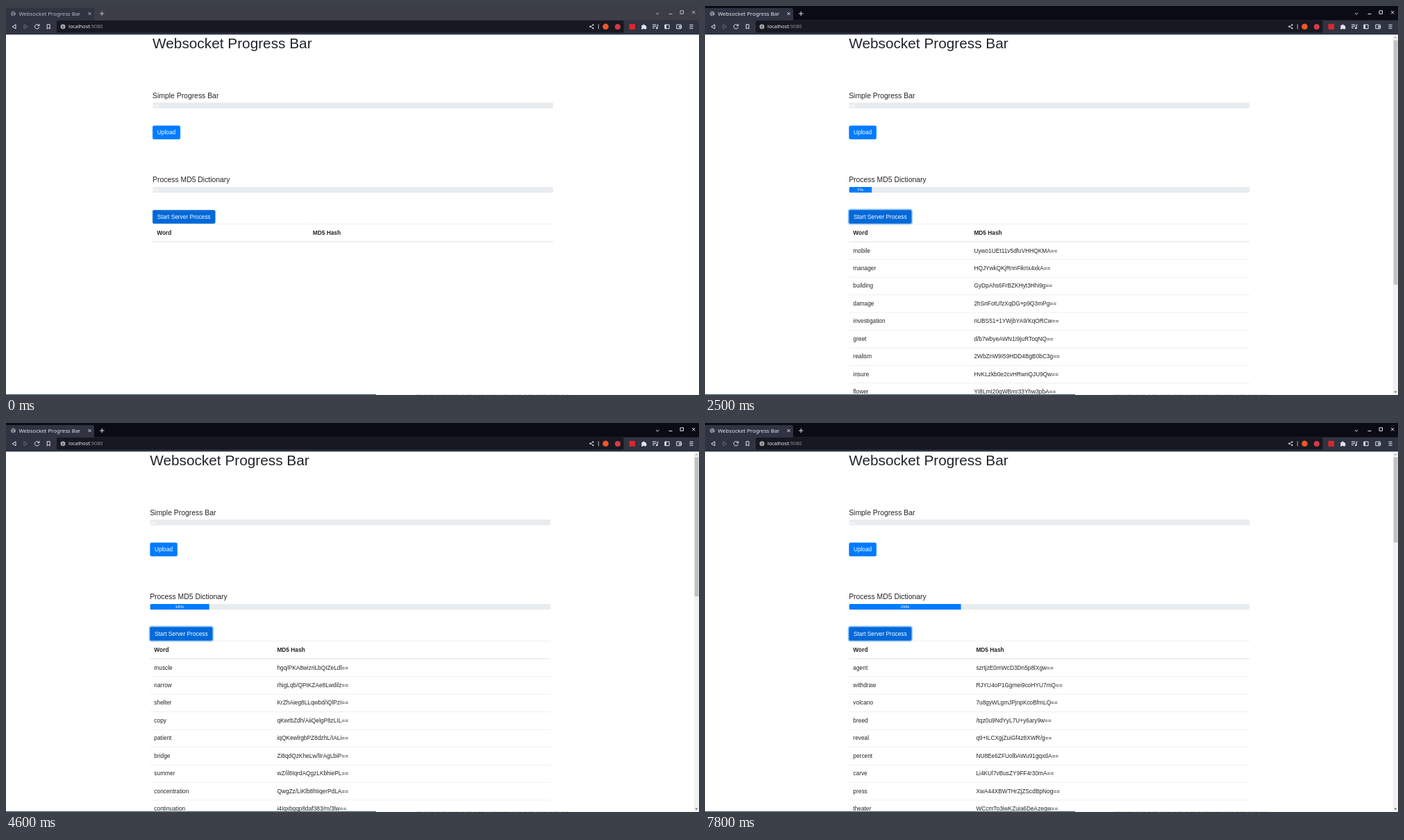
These frames come from a looping animation (998x561 px, 8 s). An HTML page:

```html
<!DOCTYPE html>
<html lang="en">
<head>
<meta charset="utf-8">
<title>Progress</title>
<style>
* { box-sizing: border-box; }
html, body { margin: 0; width: 100%; height: 100%; overflow: hidden; background: #fff; }
#stage { position: absolute; left: 0; top: 0; width: 998px; height: 561px; overflow: hidden; }
#screen { position: absolute; width: 1921px; height: 1080px; transform: scale(.51979); transform-origin: 0 0;
  font: 16px/1.5 "Liberation Sans", Arial, sans-serif; color: #212529; }
#view { position: absolute; left: 1px; top: 80px; width: 1920px; height: 998px; overflow: hidden; }
#page { position: absolute; left: 405px; width: 1110px; }
h1, h5 { font-weight: 500; line-height: 1.2; margin: 0 0 8px; }
h1 { font-size: 40px; margin-bottom: 108px; }
h5 { font-size: 20px; }
.track { display: flex; height: 16px; margin-bottom: 48px; border-radius: 4px; overflow: hidden; background: #e9ecef; font-size: 12px; }
.bar { width: 0; display: flex; flex-direction: column; justify-content: center; flex-shrink: 0;
  background: #007bff; color: #fff; text-align: center; white-space: nowrap; line-height: 16px; }
.button { display: block; width: max-content; height: 38px; padding: 6px 12px; border: 1px solid #007bff; border-radius: 4px;
  background: #007bff; color: #fff; }
#upload { margin-bottom: 100px; }
#start { background: #0069d9; border-color: #0062cc; }
table { width: 100%; border-collapse: collapse; }
th, td { padding: 12px; text-align: left; vertical-align: top; border-top: 1px solid #dee2e6; }
th { border-bottom: 2px solid #dee2e6; }
#scroll { position: absolute; right: 0; top: 0; width: 15px; height: 100%; background: #f1f1f1; }
#scroll i { position: absolute; left: 3px; border: 4.5px solid transparent; }
#up { top: 1px; border-bottom-color: #a3a3a3 !important; }
#down { bottom: 1px; border-top-color: #505050 !important; }
#thumb { position: absolute; left: 2px; top: 15px; width: 11px; background: #c1c1c1; }
svg { position: absolute; left: 0; top: 0; }
svg text { font-family: "Noto Sans", sans-serif; }
.line { fill: none; stroke: #e4e5ea; stroke-width: 1; }
</style>
</head>
<body>
<div id="stage">
  <div id="screen">
    <div id="view">
      <div id="page">
        <h1>Websocket Progress Bar</h1>
        <h5>Simple Progress Bar</h5>
        <div class="track"><div class="bar">0%</div></div>
        <div class="button" id="upload">Upload</div>
        <h5>Process MD5 Dictionary</h5>
        <div class="track"><div class="bar" id="bar">0%</div></div>
        <div class="button" id="start">Start Server Process</div>
        <table>
          <thead><tr><th>Word</th><th>MD5 Hash</th></tr></thead>
          <tbody id="rows"></tbody>
        </table>
      </div>
      <div id="scroll"><i id="up"></i><div id="thumb"></div><i id="down"></i></div>
    </div>
  </div>
  <svg width="998" height="561">
    <rect width="998" height="22" fill="#0b0b15"/>
    <rect id="inactive" width="998" height="22" fill="#3d3d45"/>
    <path d="M0 41.300V3h124q3 0 3 3V20.500H998V41.300z" fill="#303342"/>
    <rect x="73" y="21" width="816.5" height="17.5" rx="2" fill="#171820"/>
    <g id="titlebar">
      <circle cx="10.5" cy="11" r="3.3" fill="#a9abb3"/>
      <path class="line" style="stroke:#303342" d="M8 9.5l3 .7 2-1.2M8.5 12l2.5.2.5 2"/>
      <text x="18.5" y="13.6" font-size="7.8" fill="#e6e7ec">Websocket Progress Bar</text>
      <path class="line" d="M118.5 9l4 4m0-4l-4 4M135 11h6.4M138.2 7.8v6.4M936 10l2.2 2.2L940.4 10M954.5 11.5h5M971 6.8h4.5v4.5H971zM988 7l4.4 4.4m0-4.4l-4.4 4.4"/>
    </g>
    <path class="line" d="M14 26.8v6L9 29.8z"/>
    <path class="line" style="stroke:#696c79" d="M26 26.8v6l5-3z"/>
    <path class="line" d="M47.3 28A3.2 3.2 0 1 0 47.7 30.6M48 26v2.6h-2.6M59.2 26.7h4v6.3l-2-1.6-2 1.6z"/>
    <circle cx="82" cy="29.8" r="3.5" fill="#a5a7af"/>
    <path d="M82 27.8v.8m0 .8v2.5" stroke="#171820"/>
    <text x="90" y="32.3" font-size="7.3" fill="#f2f2f5">localhost<tspan fill="#8e9099">:9080</tspan></text>
    <path class="line" style="stroke-width:.8" d="M845.5 27.4l-4 2.3 4 2.3M853.3 26.3v7"/>
    <g fill="#e4e5ea">
      <circle cx="845.5" cy="27.3" r="1.1"/><circle cx="841.3" cy="29.7" r="1.1"/><circle cx="845.5" cy="32.1" r="1.1"/>
      <path d="M915 28h2a1.4 1.4 0 0 1 2.8 0h2v2a1.4 1.4 0 0 1 0 2.6v1h-2.2a1.4 1.4 0 0 0-2.6 0h-2v-2a1.3 1.3 0 0 0 0-2.4z"/>
    </g>
    <circle cx="863.5" cy="29.8" r="4.3" fill="#f2552c"/>
    <circle cx="880.9" cy="29.9" r="4" fill="#d83a45"/>
    <rect x="897.5" y="25.8" width="8.5" height="8" fill="#d9272e"/>
    <path class="line" d="M931 27h5.5M931 29.3h5.5M931 31.6h3M938.2 32V27.2h1.5M948.8 27h6.3v5.7h-6.3zM965.8 27h6.4v5.7h-6.4zM969.5 29h3.3v2h-3.3zM984.4 27.2h5.2m-5.2 2.5h5.2m-5.2 2.5h5.2"/>
    <path d="M949 27h2v5.5h-2z" fill="#e4e5ea"/>
    <circle cx="937.3" cy="32" r="1.3" fill="#e4e5ea"/>
    <path d="M0 560.5h533" stroke="#35565a"/>
    <path d="M533 560.5h465" stroke="#f1f3f3"/>
    <path d="M590 560.5h220" stroke="#d3d8d9" stroke-dasharray="9 3 4 2"/>
  </svg>
</div>
<script>
// Oldest entry first; a word without a hash gets a shuffle of the previous one.
const entries = `crash 3Kqf1PI6rwwp9UC+zzW0bw
waste yxXjLzibevmyhaY8oQRGUQ
agenda 0Nvf2O343RYIQFBVwmrclA
class ovLtT468LLtMIaKdxAq2HQ
invisible TEmZrBetzvGlp1+rceXIVw
sweep w1sDqtfTaYg+8bXpbB0owA
garden
letter
flower YI8LmI20qWBmr33Yhw3pbA
insure HvKLzkb0e2cvHRwnQJU9Qw
realism 2WbZnW9I59HDD4BgB0bC3g
greet d/b7wbyeAWN1I9juRToqNQ
investigation nUBS51+1YWjbYA9/KqORCw
damage 2hSnFotUfzXqDG+p9Q3mPg
building GyDpAhs6FrBZKHyt3Hhi9g
manager HQJYwkQKjRnnFikrIx4xkA
mobile Uywo1UEt11v5dfuVHHQKMA
ticket
river
observe
cabin
lesson
harvest HmQ7RdNuGpWx48sKbD2UoA
pat eFI0F0XJMjgiKmWpENHcxQ
smash 95F3hq+QptmeqDRV84ITNw
democratic jfh3A8S/zcYp9m4rtWxODA
gift oOw7Rhq/S8Fq1hVIEmAUDg
tooth KLJr5ZyYYXDFchM6qs4xwg
selection 71cU4FGb+qZFzf99KIQ7cA
bomb 43Opvnr7+hmqF+qlTxmviA
continuation i4Iqxbgqp8daf383/m/3lw
concentration QwgZz/LiKlb8hIiqerPdLA
summer
bridge
patient
copy
shelter
narrow
muscle
offer
freckle 9ygeDt/hpeu540MsmXgG1Q
error y14QDlqaPn9tH9l1EiFSgg
hear YT1eT0zWxoYYrIa9JExxUw
oil xa8FQ0B6bouhHbamn3kgFA
facility 6qpCoUZKorQKPs/WjiEF1w
cassette CXNTVoo2tbgeZvXsct9T9Q
ideology 1b7QsHxJwLuVmdzZxPWtmA
lean gbU0VkBuasn+zR1p+veaQQ
result tKiEF7PQFw11TGR8MLchag
window
planet
critical foW8tm+5qAnVq09iqLi+qA
bush 27xUbjVwQLSoOmXzh9XAag
chip Ly7BKWaVqfsyUbvJSi4M7w
prescription LcDCxnmS7whfn1emkNlszg
suspicion 91cXsVGNy6KUMHdlh6dX+g
dairy gB8YhXUh5fNY+Y4plChyTw
term tNrQ/l++8sDiTZ2xzGnlog
wealth xFl9kipaQu4aTgIKQu0BMw
kid feAH5D8QjktUsHn2bkKF2A
forest
number
theater WCcmTo3iwKZuia6DeAzegw
press XwA44XBWTHrZjZScdBpNog
carve Li4KUl7vBusZY9FF4r30mA
percent NU8Ee6ZFUolbAWu91gqxdA
reveal q9+ILCXgjZuiGf4z8XWR/g
breed /tqz0u9NdYyL7U+y6ary9w
volcano 7u8gyWLgmJPjnpKcoBfmLQ
withdraw RJYU4oP1Ggmei9coHYU7mQ
agent szrtjzE0mWcD3Dn5p8lXgw`.split("\n");

const $ = id => document.getElementById(id);
const clamp = v => Math.max(0, Math.min(1, v));
const shuffle = s => s.replace(/(.)(.)/g, "$2") + s.replace(/(.)(.)/g, "$1");

let lastHash;
const rows = entries.map(entry => {
  const [word, hash = shuffle(lastHash)] = entry.split(" ");
  lastHash = hash;
  const row = $("rows").insertRow(0);
  row.insertCell().textContent = word;
  row.insertCell().textContent = hash + "==";
  return row;
});

// Later repaints: [time in units of 100 ms, rows received]
const updates = [[32, 25], [34, 27], [36, 29], [39, 32], [41, 34], [44, 37], [46, 39], [49, 42], [51, 44], [53, 46],
  [56, 49], [59, 51], [61, 54], [64, 57], [68, 60], [71, 63], [73, 65], [76, 68], [78, 71]];
const TOTAL = 242, VIEW = 998, TRACK = 968;

function render(tick) {
  const early = Math.min(tick, 27);
  const count = updates.reduce((n, [at, rowCount]) => tick >= at ? rowCount : n, Math.max(0, early - 8));
  rows.forEach((row, i) => row.style.display = i < count ? "" : "none");

  $("bar").textContent = Math.floor(count / TOTAL * 100) + "%";
  $("bar").style.width = Math.max(0, count - 3.2) / TOTAL * 100 + "%";

  const height = 591 + 49 * count, scrolls = height > VIEW;
  $("scroll").style.display = scrolls ? "" : "none";
  $("thumb").style.height = TRACK * VIEW / height + "px";
  $("page").style.left = scrolls ? "397.5px" : "405px";

  const active = clamp((tick - 5) / 3);
  $("inactive").style.opacity = 1 - active;
  $("titlebar").style.opacity = .75 + .25 * active;
  $("start").style.boxShadow = `0 0 0 3.2px rgba(38,143,255,${.5 * clamp((tick - 6) / 2)})`;
}

let shown = -1;
function frame() {
  const tick = Math.floor(performance.now() % 8000 / 100);
  if (tick !== shown) render(shown = tick);
  requestAnimationFrame(frame);
}
frame();
</script>
</body>
</html>
```
